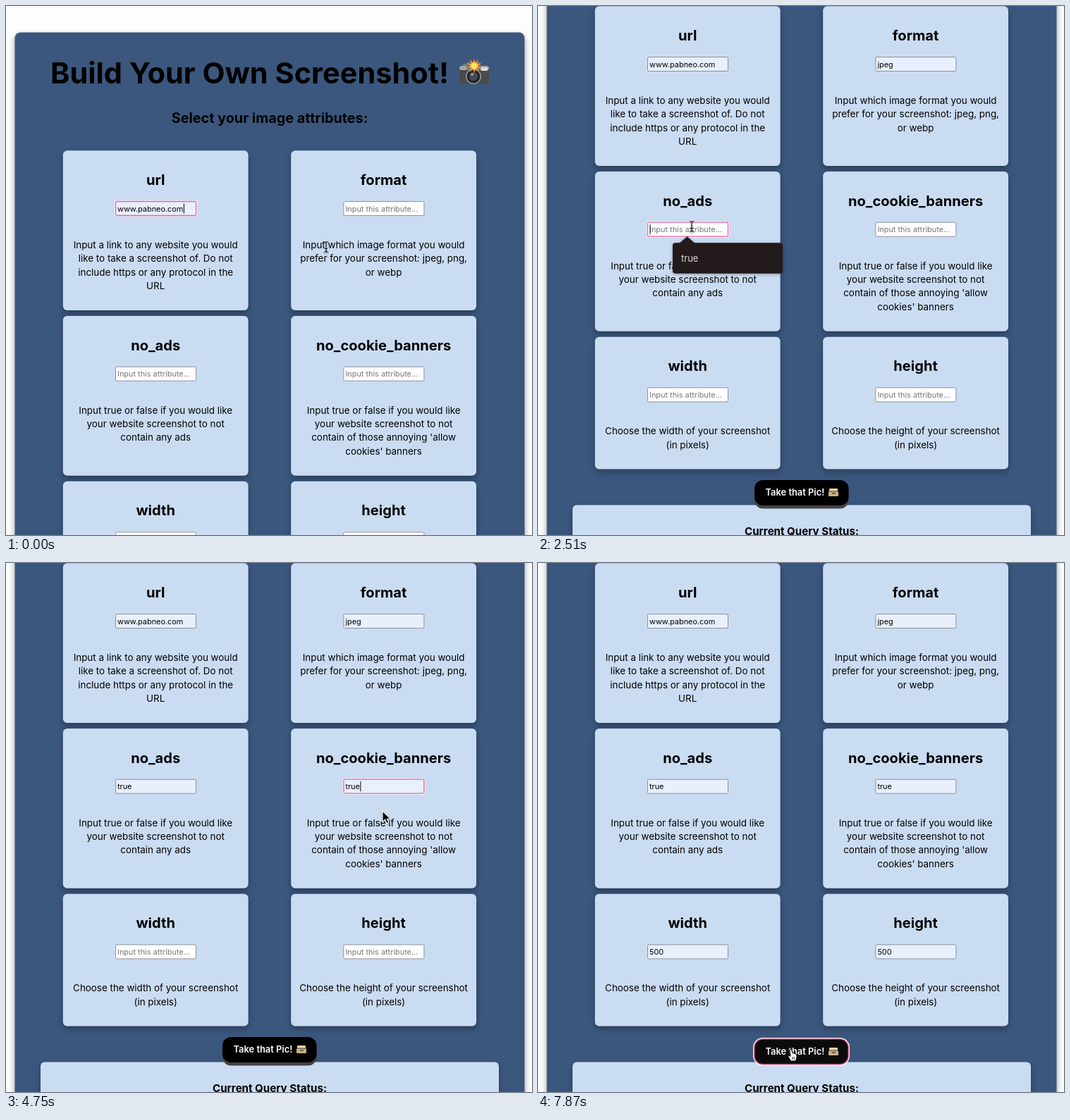
Recreate the animation shown at these times as an HTML page. Size 746 by 751 pixels, loop 8 s.

```html
<!DOCTYPE html>
<html lang="en">
<head>
<meta charset="utf-8">
<title>Screenshot builder</title>
<style>
html, body { margin: 0; width: 100%; height: 100%; overflow: hidden; background: #fdfdfd; }
svg { display: block; font-family: Inter, "Open Sans", sans-serif; }
text { white-space: pre; }
.mid { text-anchor: middle; }
.title, .sub, .head, .status { font-weight: 700; }
.title { font-size: 41.5px; }
.sub { font-size: 19.8px; }
.head { font-size: 20.1px; }
.status { font-size: 15.1px; }
.body { font-size: 13.4px; }
.field { font-size: 10.9px; }
.menu { font-size: 13px; fill: #dedada; }
.btn { font-size: 12.9px; font-weight: 600; fill: #fff; }
.panel { fill: #3b577d; filter: drop-shadow(0 4px 4px rgba(0,0,0,.4)); }
.card { fill: #cadcf2; filter: drop-shadow(0 4px 4px rgba(0,0,0,.3)); }
.popup { filter: drop-shadow(0 1px 2px rgba(0,0,0,.35)); }
.pointer { filter: drop-shadow(0 1px 1px rgba(0,0,0,.3)); }
</style>
</head>
<body>
<svg id="stage" width="746" height="751" viewBox="0 0 746 751"></svg>
<script>
const LOOP = 8000, STEP = 148.4, LAST = 53, PRESS = 51;
const stage = document.getElementById('stage');
const ruler = document.createElement('canvas').getContext('2d');

// open: focused with menu, hover: value previewed, pick: value accepted (in steps)
const fields = [
  { name: 'url', value: 'www.pabneo.com', open: 0, hover: 0, pick: 0,
    lines: ['Input a link to any website you would', 'like to take a screenshot of. Do not',
            'include https or any protocol in the', 'URL'] },
  { name: 'format', value: 'jpeg', open: 3, hover: 5, pick: 7,
    lines: ['Input which image format you would', 'prefer for your screenshot: jpeg, png,', 'or webp'] },
  { name: 'no_ads', value: 'true', open: 17, hover: 20, pick: 22,
    lines: ['Input true or false if you would like', 'your website screenshot to not', 'contain any ads'] },
  { name: 'no_cookie_banners', value: 'true', open: 26, hover: 30, pick: 32,
    lines: ['Input true or false if you would like', 'your website screenshot to not',
            "contain of those annoying 'allow", "cookies' banners"] },
  { name: 'width', value: '500', open: 35, hover: 37, pick: 39,
    lines: ['Choose the width of your screenshot', '(in pixels)'] },
  { name: 'height', value: '500', open: 43, hover: 45, pick: 46,
    lines: ['Choose the height of your screenshot', '(in pixels)'] }
];
fields.forEach((f, i) => {
  f.x = i % 2 ? 404.2 : 80.8;
  f.y = 205.3 + 234.7 * (i >> 1);
  f.h = i < 4 ? 226.7 : 187.7;
  f.close = i < 5 ? fields[i + 1].open : PRESS;
});

// step, x, y, shape
const path = [
  [0, 454, 342, 'beam'], [2, 508, 296, 'beam'], [3, 516, 288, 'beam'], [4, 520, 292, 'beam'],
  [5, 535, 322, 'arrow'], [8, 538, 326, 'arrow'], [10, 297.5, 460, 'arrow'], [14, 297.5, 460, 'arrow'],
  [16, 224, 320, 'beam'], [17, 218, 313, 'beam'], [19, 217, 318, 'beam'], [20, 215, 350, 'arrow'],
  [23, 218, 352, 'arrow'], [26, 508, 319, 'beam'], [27, 514, 319, 'beam'], [29, 516, 322, 'beam'],
  [30, 532, 350, 'arrow'], [32, 534, 352, 'arrow'], [35, 222, 553, 'beam'], [36, 218, 556, 'beam'],
  [37, 215.5, 582, 'arrow'], [39, 217, 584, 'arrow'], [42, 512, 554, 'beam'], [44, 520, 555, 'beam'],
  [45, 533, 584, 'arrow'], [46, 533, 586, 'arrow'], [48, 372, 658, 'arrow'], [49, 372, 658, 'arrow'],
  [50, 364, 684, 'hand'], [51, 359, 698, 'hand'], [53, 359, 698, 'hand']
];

const scrolls = { 11: 95, 12: 187, 13: 202 };
const scrollAt = k => k < 11 ? 0 : scrolls[k] ?? 205;

const text = (cls, x, y, s, extra = '') => `<text class="${cls}" x="${x}" y="${y}" ${extra}>${s}</text>`;
const rect = (x, y, w, h, r, attrs) =>
  `<rect x="${x}" y="${y}" width="${w}" height="${h}" rx="${r}" ${attrs}/>`;

function textWidth(s) {
  ruler.font = '10.9px Inter, "Open Sans", sans-serif';
  return ruler.measureText(s).width;
}

function burst(x, y, points, outer, inner, color) {
  const pts = Array.from({ length: points * 2 }, (_, i) => {
    const a = i * Math.PI / points - Math.PI / 2, r = i % 2 ? inner : outer;
    return (x + r * Math.cos(a)).toFixed(1) + ',' + (y + r * Math.sin(a)).toFixed(1);
  });
  return `<polygon points="${pts.join(' ')}" fill="${color}"/>`;
}

const circle = (x, y, r, fill) => `<circle cx="${x}" cy="${y}" r="${r}" fill="${fill}"/>`;

const camera =
  rect(648, 82, 8, 5, 1, 'fill="#777"') + rect(643, 85, 42, 26, 3, 'fill="#4a4a4c"') +
  rect(643, 85, 42, 6, 3, 'fill="#a5a5a5"') + rect(653, 80, 20, 11, 2, 'fill="#777"') +
  rect(674, 87, 9, 5, 1, 'fill="#ddd"') +
  circle(663, 100, 11, '#999') + circle(663, 100, 9.5, '#252527') +
  circle(663, 100, 6, '#444a55') + circle(661, 97, 2, '#8c98a8') +
  burst(664, 85, 10, 11, 5, '#ef8d20') + burst(664, 85, 10, 7, 3.5, '#ffe06a');

function fieldCard(f, k) {
  const cx = f.x + 131.4, ix = f.x + 74.7, iy = f.y + 72.2;
  const focused = k >= f.open && k < f.close, filled = k >= f.hover, picked = k >= f.pick;
  let s = rect(f.x, f.y, 262.8, f.h, 6, 'class="card"') + text('head mid', cx, f.y + 48.7, f.name);
  if (focused) s += rect(ix - 1.5, iy - 1.5, 117, 23, 3, 'fill="#fff"');
  s += rect(ix, iy, 114, 20, 1.5,
    `fill="${filled ? '#e8f0fe' : '#fff'}" stroke="${focused ? '#ee5c98' : '#8d929b'}" stroke-width="${focused ? 1.3 : 1}"`);
  s += text('field', ix + 2.5, iy + 14, filled ? f.value : 'Input this attribute...', filled ? '' : 'fill="#757575"');
  if (focused && (k - (picked ? f.pick : f.open)) % 7 < 4) {
    const x = ix + 3 + (picked ? textWidth(f.value) : 0);
    s += rect(x, iy + 3, 1, 14, 0, 'fill="#000"');
  }
  f.lines.forEach((line, i) => s += text('body mid', cx, f.y + 138.5 + 19.4 * i, line));
  return s;
}

function popup(f, k) {
  if (k < f.open || k >= f.pick) return '';
  const x = f.x + 110.2, y = f.y + 101.2;
  return `<g class="popup">` + rect(x, y, 156, 43.5, 4, 'fill="#231a1b"') +
    `<path d="M${x + 9} ${y + 1}l11.5 -10l11.5 10z" fill="#231a1b"/></g>` +
    (k >= f.hover ? rect(x, y + 2.5, 155.5, 38.5, 0, 'fill="#3c3133"') : '') +
    text('menu', x + 12, y + 26.5, f.value);
}

function button(k) {
  const down = k >= PRESS, y = down ? 881 : 878;
  const face = down
    ? rect(305, y - 2, 137, 39.5, 14, 'fill="#fff"') +
      rect(307, y, 133, 35.5, 12, 'fill="#0b0b0b" stroke="#b8325f" stroke-width="1.5"')
    : rect(307, y + 4.5, 133.5, 36, 12, 'fill="#444"') +
      rect(307, y, 133.5, 36, 12, `fill="${k === PRESS - 1 ? '#0b0b0b' : '#000'}"`);
  return face + text('btn', 322.5, y + 22.2, 'Take that Pic!') +
    rect(413, y + 12, 12, 4, 1, 'fill="#e8d5a8"') + rect(412, y + 16, 14, 7, 1, 'fill="#c9b184"') +
    rect(412, y + 15.5, 14, 1.2, 0, 'fill="#5d5142"') + rect(417, y + 18, 5, 2, 0, 'fill="#6d6250"');
}

const beam = 'M-3 -7.5Q0 -7.5 0 -5Q0 -7.5 3 -7.5M0 -5V5M-3 7.5Q0 7.5 0 5Q0 7.5 3 7.5M-2 2.5H2';
const shapes = {
  beam: `<path d="${beam}" fill="none" stroke="#fff" stroke-width="2.6"/>
    <path d="${beam}" fill="none" stroke="#000" stroke-width="1.2"/>`,
  arrow: '<path d="M0 0V15.5L3.6 12.2L6 17.8L8.8 16.6L6.4 11.2H11.2Z" stroke="#fff" stroke-width="1.1"/>',
  hand: `<path d="M-2 -7Q0 -9 1 -6L2 -2Q4 -3 4.5 -1.5Q7 -2 7 0Q8.5 0 8 4L6.5 9H-0.5L-4 3Q-5 1 -3 1L-1 2.5Z"
    fill="#fff" stroke="#000" stroke-width="1"/><path d="M2 3V7M4.2 3V7" stroke="#000" stroke-width=".8"/>`
};

function pointer(k) {
  const i = Math.max(0, path.findIndex(p => p[0] >= k));
  const b = path[i], a = path[Math.max(0, i - 1)];
  const u = b === a ? 1 : (k - a[0]) / (b[0] - a[0]);
  const x = a[1] + (b[1] - a[1]) * u, y = a[2] + (b[2] - a[2]) * u;
  const shape = u === 1 ? b[3] : 'arrow';
  return `<g class="pointer" transform="translate(${x} ${y})">${shapes[shape]}</g>`;
}

function draw(k) {
  stage.innerHTML = `<g transform="translate(0 ${-scrollAt(k)})">` +
    rect(12.5, 37.5, 723, 1200, 8, 'class="panel"') +
    text('title', 63, 109.5, 'Build Your Own Screenshot!') + camera +
    text('sub mid', 374, 166, 'Select your image attributes:') +
    fields.map(f => fieldCard(f, k)).join('') +
    rect(49, 913.5, 650, 300, 6, 'class="card"') +
    text('status mid', 374, 955.5, 'Current Query Status:') +
    button(k) + fields.map(f => popup(f, k)).join('') + '</g>' + pointer(k);
}

let shown = -1;
function tick(now) {
  const k = Math.min(LAST, Math.floor((now % LOOP + 14) / STEP));
  if (k !== shown) draw(shown = k);
  requestAnimationFrame(tick);
}
draw(0);
requestAnimationFrame(tick);
</script>
</body>
</html>
```
